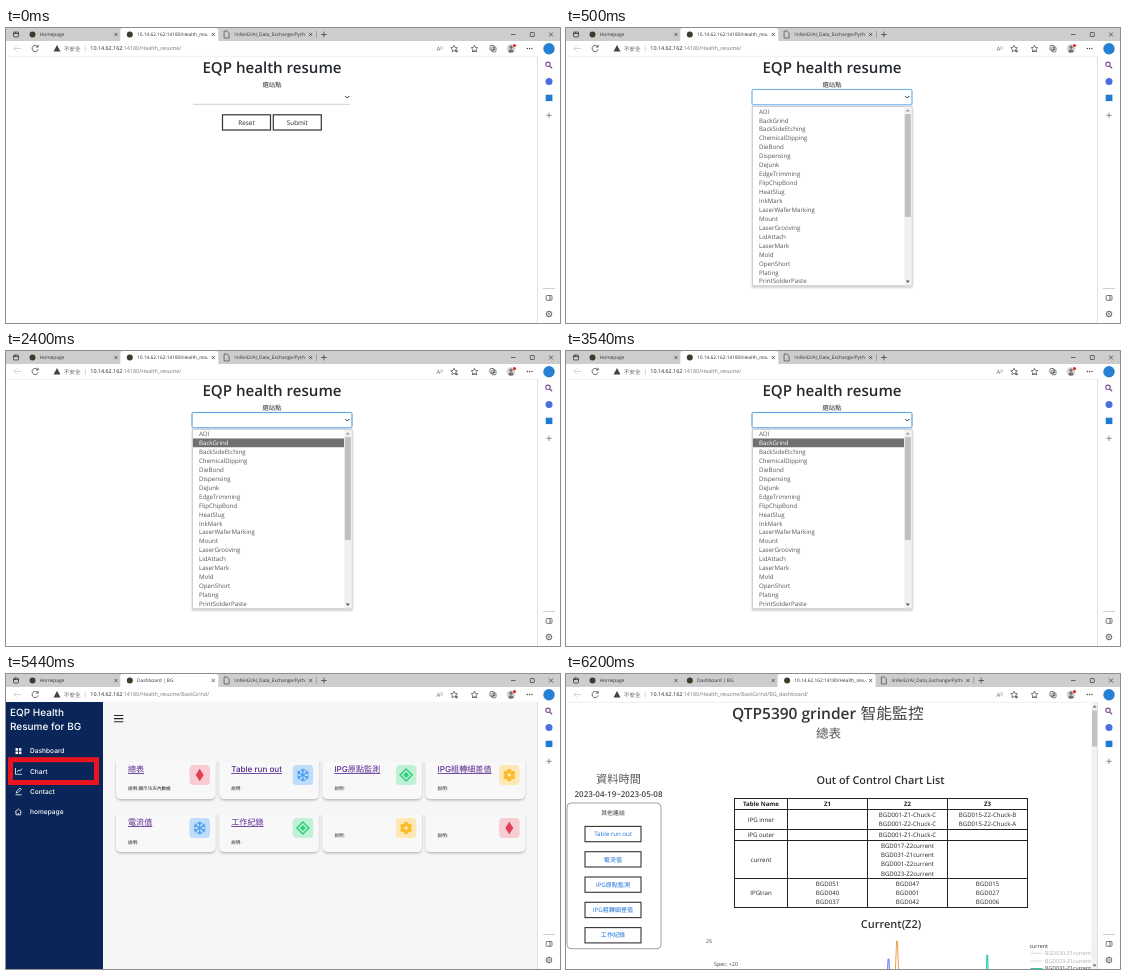
These frames come from a looping animation (554 by 295 pixels, 8000 ms). An HTML page:

```html
<!DOCTYPE html>
<html lang="zh-Hant">
<head>
<meta charset="utf-8">
<style>
html, body { margin: 0; width: 100%; height: 100%; overflow: hidden; background: #fff; }
svg { display: block; width: 100%; height: 100%; text-rendering: geometricPrecision; font-family: "Open Sans", "Noto Sans CJK TC", "Noto Sans CJK", sans-serif; }
.ui { font-family: Inter, "Noto Sans CJK TC", "Noto Sans CJK", sans-serif; }
</style>
</head>
<body>
<svg id="stage" viewBox="0 0 554 295">
  <filter id="soft" x="-10%" y="-10%" width="120%" height="130%">
    <feDropShadow dx="0" dy="1.3" stdDeviation="1.2" flood-opacity=".28"/>
  </filter>
  <clipPath id="low"><path d="M97 88H531V133H97zM97 141H531V190H97z"/></clipPath>
</svg>
<script>
const stage = document.getElementById('stage');
const INK = '#25292d', MID = 'text-anchor="middle"', BOLD = 'font-weight="600"';

const text = (x, y, s, size, fill = INK, more = '') =>
  `<text x="${x}" y="${y}" font-size="${size}" fill="${fill}" ${more}>${s}</text>`;
const mid = (x, y, s, size, fill = INK, more = '') => text(x, y, s, size, fill, MID + ' ' + more);
const rect = (x, y, w, h, fill, more = '') =>
  `<rect x="${x}" y="${y}" width="${w}" height="${h}" fill="${fill}" ${more}/>`;
const box = (x, y, w, h, color, width = 1, r = 0) =>
  rect(x, y, w, h, 'none', `stroke="${color}" stroke-width="${width}" rx="${r}"`);
const line = (d, color = '#333', width = .8) =>
  `<path d="${d}" fill="none" stroke="${color}" stroke-width="${width}"/>`;
const shape = (d, fill) => `<path d="${d}" fill="${fill}"/>`;
const dot = (x, y, r, fill) => `<circle cx="${x}" cy="${y}" r="${r}" fill="${fill}"/>`;
const ring = (x, y, r, color, width = .8) =>
  `<circle cx="${x}" cy="${y}" r="${r}" fill="none" stroke="${color}" stroke-width="${width}"/>`;
const cross = (x, y, r) => line(`M${x - r} ${y - r}l${2 * r} ${2 * r}m0 ${-2 * r}l${-2 * r} ${2 * r}`, '#333', .7);
const plus = (x, y, r, color) => line(`M${x - r} ${y}h${2 * r}M${x} ${y - r}v${2 * r}`, color, .7);
const star = (x, y) => line(`M${x} ${y - 3.3}l1 2.2 2.3.3-1.7 1.6.4 2.3-2-1.1-2 1.1.4-2.3-1.7-1.6 2.3-.3z`, '#444', .7);

// Browser window
function tab(i, title, active) {
  const x = 17 + i * 97.3, isFile = title.includes('_Data_');
  return (active ? shape(`M${x} 13V2.5q0-2.5 2.5-2.5h93q2.5 0 2.5 2.5V13z`, '#fff') : '') +
    (isFile ? line(`M${x + 6.5} 3h3l2 2v5h-5z`, '#444', .7) : dot(x + 9.5, 6.5, 3, '#3a3d2a')) +
    `<svg x="${x + 16.7}" y="0" width="71" height="13">${text(0, 8.2, title, 4.8, '#333')}</svg>` +
    cross(x + 93, 6.5, 1.6);
}

function browser(titles, active, path) {
  const end = 18.5 + titles.length * 97.3;
  return rect(0, 0, 554, 13, '#cdcdcd') + rect(0, 13, 554, 15, '#fff') +
    box(7.5, 4, 5, 5, '#333', .8, 1) + line('M7.5 5.5h5M9.5 5.5v-1.5', '#333') +
    titles.map((s, i) => tab(i, s, i === active)).join('') +
    line(`M${end} 3v7`, '#888', .6) + plus(end + 7.5, 6.5, 2.8, '#333') +
    line('M505 6.5h4.5', '#333', .7) + box(524.3, 4.5, 4, 4, '#333', .7, .5) + cross(545, 6.5, 2) +
    line('M15 20.5H8m3-3l-3 3 3 3', '#ccc') +
    line('M31.8 18.8a3.1 3.1 0 1 0 .4 2.5M32.2 16.8v2.3h-2.3', '#444') +
    shape('M51 17l3.5 6.4h-7z', '#444') + text(57.7, 22.5, '不安全', 5.6, '#666') +
    line('M79.3 17.5v6', '#bbb', .6) +
    text(84.3, 22.4, `10.14.62.162<tspan fill="#777">:14180/${path}</tspan>`, 5.4, '#222') +
    text(430.5, 22.8, 'A<tspan font-size="4" dy="-1.5">))</tspan>', 6, '#666') +
    star(448, 20.5) + plus(450.7, 23, 1.5, '#444') + star(468.5, 20.5) +
    line('M466 23.5h5', '#444', .6) +
    box(484, 17.5, 4.2, 4.8, '#444', .7, 1) + box(485.8, 19, 4.2, 4.8, '#444', .7, 1) + plus(487.9, 21.4, 1.1, '#444') +
    dot(505, 20.5, 4.3, '#d8d2d0') + dot(505, 19.2, 1.6, '#77706e') + shape('M502 23.5q3-4.5 6 0-3 2.5-6 0z', '#77706e') +
    dot(508.5, 17.5, 1.6, '#d62f3a') +
    [521.3, 523.6, 525.9].map(x => dot(x, 20.5, .65, '#333')).join('') +
    line('M0 28.3H531', '#e2e2e2', .6);
}

function sidePanel() {
  const teeth = Array.from({ length: 8 }, (_, i) =>
    `<path d="M543 282.7v1" stroke="#555" stroke-width="1.2" transform="rotate(${i * 45} 543 286)"/>`).join('');
  return rect(531, 13, 23, 282, '#fff') + line('M531.5 28V295', '#d9d9d9') +
    dot(543, 20.8, 5.7, '#2680d2') +
    ring(542, 36.3, 2.2, '#7b4d96', 1.1) + line('M543.7 38l2.4 2.3', '#7b4d96', 1.2) +
    dot(543, 53.4, 3.5, '#4a70dd') + rect(539.7, 66.7, 6.7, 6.4, '#1f7bd0') +
    plus(543, 87.3, 2.7, '#666') + line('M537 260.5h12', '#bbb', .7) +
    box(540.2, 267.5, 5.8, 4.8, '#444', .7, .7) + line('M544 267.5v4.8', '#444', .8) +
    teeth + ring(543, 286, 2.6, '#555', .7) + ring(543, 286, 1, '#555', .6);
}

// Pages
const formTitle = () => mid(266, 45.2, 'EQP health resume', 15.1, INK, BOLD) + mid(266, 58.8, '選站點', 6.3);

const button = (x, w, label) =>
  box(x, 86.8, w, 15.2, '#333', 1.2) + mid(x + w / 2, 97, label, 6.4);

const formClosed = () => formTitle() + line('M187 76.3H344', '#bbb', .7) +
  line('M339.3 68l2 2 2-2', '#333', 1) + button(216.5, 48, 'Reset') + button(267.3, 48, 'Submit');

const stations = ['AOI', 'BackGrind', 'BackSideEtching', 'ChemicalDipping', 'DieBond', 'Dispensing', 'DeJunk',
  'EdgeTrimming', 'FlipChipBond', 'HeatSlug', 'InkMark', 'LaserWaferMarking', 'Mount', 'LaserGrooving',
  'LidAttach', 'LaserMark', 'Mold', 'OpenShort', 'Plating', 'PrintSolderPaste'];

function formOpen(chosen, edge, top) {
  const items = stations.map((s, i) => {
    const y = top + i * 8.94, on = i === chosen;
    return (on ? rect(187, y - 4.4, 151, 8.8, '#707070') : '') + text(193, y + 2.2, s, 6.15, on ? '#fff' : '#555');
  }).join('');
  return formTitle() + box(186, 61.5, 160, 15.3, '#cfe3f8', 1.6, 1.5) + box(186, 61.5, 160, 15.3, edge, .8, 1.2) +
    line('M339.3 68l2 2 2-2', '#333', 1) +
    rect(186.3, 78.3, 159.7, 179.5, '#fff', 'stroke="#bbb" stroke-width=".7" filter="url(#soft)"') +
    rect(338.3, 78.8, 7.2, 178.6, '#f1f1f1') + rect(338.8, 86, 6, 103, '#c1c1c1') +
    shape('M339.8 83.5h4l-2-2.3z', '#999') + shape('M339.8 252.6h4l-2 2.3z', '#555') + items;
}

const icons = {
  red: ['#f7cdd3', (x, y) => shape(`M${x} ${y - 6.3}l4 6.3-4 6.3-4-6.3z`, '#df4057')],
  blue: ['#bfdcfb', (x, y) => [0, 60, 120].map(a =>
    `<path d="M${x} ${y - 6.5}v13m-2-12l2 2 2-2m-4 11l2-2 2 2" fill="none" stroke="#4d9ff0" stroke-width="1.2" transform="rotate(${a} ${x} ${y})"/>`).join('')],
  green: ['#c0f0d6', (x, y) => line(`M${x} ${y - 6}l6 6-6 6-6-6z`, '#2bcf7c', 1.4) + shape(`M${x} ${y - 3}l3 3-3 3-3-3z`, '#2bcf7c')],
  gold: ['#ffe8b3', (x, y) => [0, 60, 120, 180, 240, 300].map(a =>
    dot(x + 4 * Math.sin(a * Math.PI / 180), y - 4 * Math.cos(a * Math.PI / 180), 2.3, '#fdbc2c')).join('') +
    dot(x, y, 3.4, '#fdbc2c') + dot(x, y, 1.8, '#ffe8b3')]
};

function card(i, title, note, kind) {
  const col = i % 4, row = i > 3 ? 1 : 0, x = 110 + col * 103.2, y = 87 + row * 53;
  const [tint, draw] = icons[kind], noteY = y + (row && col > 1 ? 23.3 : row ? 30 : 29.3);
  return `<g clip-path="url(#low)">${rect(x, y - 6, 99.5, 44, '#f8f8f8', 'rx="5" filter="url(#soft)"')}</g>` +
    text(x + 12, y + 11, title, 8.1, '#5a2a91', 'font-weight="500" text-decoration="underline"') +
    text(x + 12, noteY, note, 4.6, '#222') +
    rect(x + 73.5, y + 4, 20.5, 20, tint, 'rx="4"') + draw(x + 83.7, y + 14);
}

function dashboard() {
  const cards = [['總表', '說明:顯示15天內數據', 'red'], ['Table run out', '說明:', 'blue'], ['IPG原點監測', '說明:', 'green'],
    ['IPG粗轉細差值', '說明:', 'gold'], ['電流值', '說明:', 'blue'], ['工作紀錄', '說明:', 'green'], ['', '說明:', 'gold'], ['', '說明:', 'red']];
  const menu = ['Dashboard', 'Chart', 'Contact', 'homepage'];
  return '<g class="ui">' + rect(97, 28, 434, 267, '#f6f6f6') + rect(0, 28, 97, 267, '#0a2558') +
    text(4, 42, 'EQP Health', 10, '#fff', 'font-weight="500"') +
    text(4, 56.3, 'Resume for BG', 10, '#fff', 'font-weight="500"') +
    menu.map((s, i) => text(24, 79.3 + i * 20.3, s, 6.6, '#fff', 'font-weight="500"')).join('') +
    [9.5, 12.9].map(x => [74.2, 77.6].map(y => rect(x, y, 2.5, 2.5, '#fff')).join('')).join('') +
    line('M9.5 94v6.3h6.5M11 98l1.7-2 1.3 1 2-2.5', '#fff') +
    line('M9.5 120.8h6M10.3 119l.4-1.8 3.2-3.2 1.3 1.3-3.2 3.2z', '#fff') +
    line('M9 138l3.3-3 3.3 3M10 137.5v3.3h4.6v-3.3M12.3 141v-2', '#fff') +
    box(4.5, 85.7, 86, 22.8, '#e9141f', 5) +
    line('M108 41.5h9.3m-9.3 3.1h9.3m-9.3 3.1h9.3', '#222', 1.1) +
    cards.map((c, i) => card(i, ...c)).join('') + '</g>';
}

function report() {
  const links = ['Table run out', '電流值', 'IPG原點監測', 'IPG粗轉細差值', '工作紀錄'];
  const xs = [168.5, 221.5, 301.5, 381.5, 461.5], ys = [124.5, 135.5, 155.5, 166.5, 204.5, 233.5];
  const rows = [
    ['Table Name', 'Z1', 'Z2', 'Z3'],
    ['IPG inner', '', 'BGD001-Z1-Chuck-C BGD001-Z2-Chuck-C', 'BGD015-Z2-Chuck-B BGD015-Z2-Chuck-A'],
    ['IPG outer', '', 'BGD001-Z1-Chuck-C', ''],
    ['current', '', 'BGD017-Z2current BGD031-Z1current BGD001-Z2current BGD023-Z2current', ''],
    ['IPGtran', 'BGD051 BGD040 BGD037', 'BGD047 BGD001 BGD042', 'BGD015 BGD027 BGD006']
  ];
  const cells = rows.map((row, r) => row.map((s, c) => {
    const lines = r && c ? s.split(' ') : [s];
    const x = (xs[c] + xs[c + 1]) / 2, y = (ys[r] + ys[r + 1]) / 2 + 2.2;
    return lines.map((l, i) => mid(x, y + (i - (lines.length - 1) / 2) * 9.2, l, 6.1, '#222', r ? '' : 'font-weight="700"')).join('');
  }).join('')).join('');
  const grid = xs.map(x => `M${x} 124.5V233.5`).join('') + ys.map(y => `M168 ${y}H462`).join('');
  const spike = (x, top, w, color) => line(`M${x - w} 296L${x - .4} ${top}h.8L${x + w} 296`, color, 1);
  const key = (y, s, color, ink) => line(`M464.5 ${y}h12`, color, 1) + text(479, y + 1.8, s, 5.3, ink);
  return text(166, 45.3, 'QTP5390 grinder', 15.5, '#333', BOLD) + text(294.5, 45.3, '智能監控', 15.8, '#444') +
    mid(262.5, 64, '總表', 12.6, '#555') +
    mid(52.5, 109.3, '資料時間', 11.2, '#555') + mid(52.5, 122.6, '2023-04-19~2023-05-08', 8, '#444', BOLD) +
    box(1, 129, 94, 145.7, '#888', .8, 4) + mid(47, 140.5, '其他連結', 5.9, '#333') +
    links.map((s, i) => box(19, 152.4 + i * 25.3, 56, 15.3, '#333', 1.1) +
      mid(47, 162.2 + i * 25.3, s, 6.1, '#1971d8')).join('') +
    mid(314.5, 109.5, 'Out of Control Chart List', 10.9, '#333', BOLD) +
    line(grid, '#222', 1) + cells +
    mid(325, 254, 'Current(Z2)', 11, '#333', BOLD) +
    text(140, 269, '25', 5.3, '#444') + text(148, 292, 'Spec: +20', 5.4, '#444') +
    spike(322.5, 285, .9, '#636efa') + spike(331, 267, 1.6, '#f0a04b') + spike(421.3, 281, .8, '#19bfa5') +
    text(463.5, 273.5, 'current', 5.4, '#333') +
    key(279.3, 'BGD030-Z1current', '#ddd', '#aaa') + key(287, 'BGD023-Z1current', '#ddd', '#aaa') +
    key(294.6, 'BGD031-Z1current', '#19bfa5', '#333') +
    rect(525.5, 28.5, 6, 267, '#f1f1f1') + shape('M526.6 33.5h4l-2-2.3z', '#666') + rect(526, 36.5, 5, 36, '#c1c1c1') +
    shape('M526.6 290.5h4l-2 2.3z', '#666');
}

const host = '10.14.62.162:14180/Health_resume', file = 'linfei42/AI_Data_Exchange/Python';
const formTabs = ['Homepage', host, file], base = 'Health_resume/';
const formBar = browser(formTabs, 1, base);
const scenes = [
  [0, formBar + formClosed()],
  [500, formBar + formOpen(-1, '#6aa9e6', 83.4)],
  [2400, formBar + formOpen(1, '#4a95dd', 82.9)],
  [4300, browser(['Homepage', 'Dashboard | BG', file], 1, base + 'BackGrind/') + dashboard()],
  [6200, browser(['Homepage', 'Dashboard | BG', host, file], 2, base + 'BackGrind/BG_dashboard/') + report()]
];
stage.insertAdjacentHTML('beforeend', scenes.map(s => `<g class="scene">${s[1]}</g>`).join('') + sidePanel());
const groups = [...stage.querySelectorAll('.scene')];

const start = performance.now();
function show(now) {
  const t = Math.max(0, now - start) % 8000;
  const current = scenes.filter(s => s[0] <= t).length - 1;
  groups.forEach((g, i) => g.style.display = i === current ? '' : 'none');
  requestAnimationFrame(show);
}
show(start);
</script>
</body>
</html>
```
